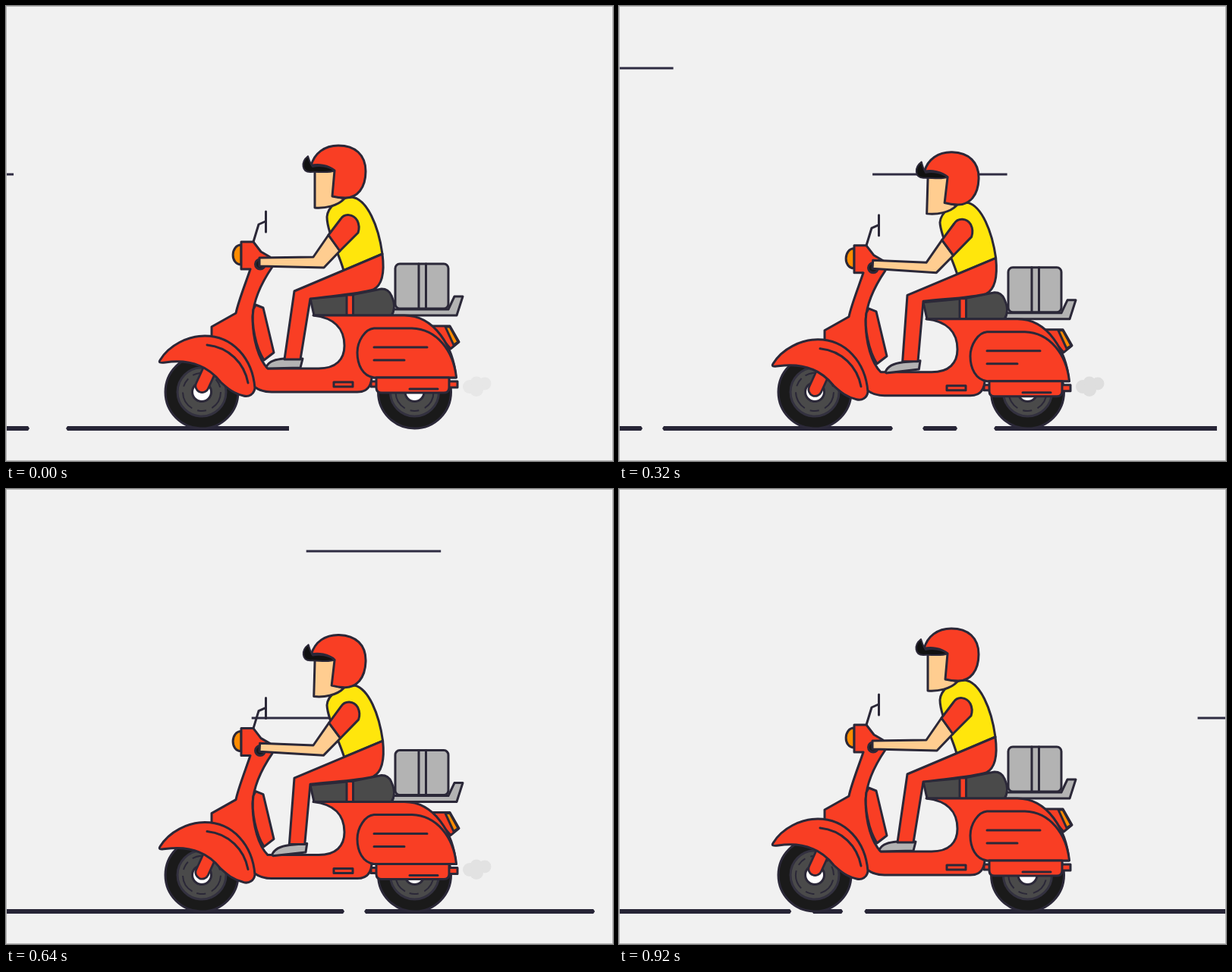
Recreate the animation shown at these times as an HTML page. Size 800 px wide and 600 px high, loop 0.96 s.

```html
<!DOCTYPE html>
<html lang="en">
<head>
<meta charset="utf-8">
<title>Scooter ride</title>
<style>
  html, body { margin: 0; width: 100%; height: 100%; overflow: hidden; background: #f1f1f1; }
  svg { display: block; width: 100vw; height: 100vh; }
  .ink { stroke: #2b2838; stroke-width: 3; stroke-linecap: round; stroke-linejoin: round; }
  .red { fill: #f93e24; }
  .grey { fill: #b3b3b3; }
  .seat { fill: #4a4a4a; }
  .skin { fill: #ffcd90; }
  .lamp { fill: #ff8c00; }
  .vest { fill: #ffe60c; }
  .none { fill: none; }
</style>
</head>
<body>
<svg viewBox="0 0 800 600">
  <defs>
    <g id="wheel">
      <circle class="ink" r="48" fill="#1a1a1a"/>
      <circle r="32" fill="#4a4a4a" stroke="#33313f" stroke-width="3"/>
      <circle class="spin" r="25" fill="none" stroke="#2b2838" stroke-width="2" stroke-dasharray="25 8 12 7.4"/>
      <circle class="ink" r="12.5" fill="#fff"/>
    </g>
  </defs>
  <rect width="800" height="600" fill="#f1f1f1"/>
  <g id="wind" fill="none" stroke="#2f2c42" stroke-width="3"></g>
  <g id="road" fill="none" stroke="#272536" stroke-width="6"></g>

  <g id="smoke" fill="#dadada">
    <circle cx="611" cy="502" r="9"/>
    <circle cx="620" cy="497" r="8.5"/>
    <circle cx="631" cy="498" r="8.5"/>
    <circle cx="620" cy="506" r="9"/>
  </g>

  <use href="#wheel" x="258" y="509"/>
  <use href="#wheel" x="538.5" y="509"/>

  <g id="scooter" class="ink">
    <path class="red" d="M481 495H490V502H481ZM583 495H595V503H583Z"/>
    <path class="red" d="M560 422H585L597 443L586 452Z"/>
    <path class="lamp" d="M579 423H585L596 443L590 447Z"/>
    <path class="none" d="M326 311L333 288L342 284M342.5 271V298"/>
    <path class="lamp" d="M310 315C296 315 295 341 310 341Z"/>

    <path class="grey" d="M511 400H583L591 383H602L594 408H509Z"/>
    <rect class="grey" x="513" y="340" width="70" height="59" rx="6"/>
    <path class="none" d="M544 340V399M553.5 340V399"/>

    <path class="seat" d="M401 386L406 408H508C513 400 512 390 508 382C505 375 500 373 495 373L455 381Z"/>
    <path class="red" d="M449 381H457.5V408H449Z"/>

    <path class="red" d="M310 311H326L336 324L348 331L351 344C336 366 326 390 325 410C325 440 333 466 345 478H412C435 478 446 466 446 448C446 425 432 411 405 408H525C565 408 590 450 593 490H482C481 503 474 509 463 509H350C340 509 334 507 327 502L271 440V423L303 405C306 390 316 365 322 347H310Z"/>
    <path class="red" d="M329 394L339 398L353 457L340 467C329 450 323 420 326 400Z"/>
    <path class="red" d="M485 425H535C568 426 590 455 593.5 490H485C470 488 463 473 463 457C463 442 473 426 485 425Z"/>
    <path class="none" d="M485 450H555M485 467H525"/>
    <path class="red" d="M432 496H457V502H432Z"/>
    <path class="red" d="M488 490H584V503Q584 510 577 510H495Q488 510 488 503Z"/>
    <path class="none" d="M532 505H569"/>
    <circle cx="335" cy="340.5" r="6.5" fill="#1a1a1a"/>

    <path class="none" d="M269 478L258.5 501" style="stroke-width:20"/>
    <path class="none" d="M269 478L258.5 501" style="stroke:#f93e24;stroke-width:14.5"/>
    <path class="red" d="M203 467C215 447 240 435 262 435C299 435 325 465 328 504C327 512 320 516 313 514C300 511 293 505 283 496C268 477 245 465 210 470C203 471 201 470 203 467Z"/>
    <path class="none" d="M265 447C294 450 314 471 319 497"/>
  </g>

  <g id="rider" class="ink"></g>

  <g id="head" class="ink">
    <path class="skin" d="M407 217V266C420 267 437 264 446 254L431 250L434 217Z"/>
    <path class="red" d="M430 251L433 217C425 210 410 208 402 211C406 194 420 184 438 184C460 184 474 196 474 218C474 240 463 253 447 253C440 253 434 252 430 251Z"/>
    <path d="M398 198C400 204 401 208 404 212C413 210 425 211 433 217C425 221 410 218 401 219C390 219 388 206 398 198Z" fill="#111" style="stroke-width:2"/>
  </g>
  <rect x=".5" y=".5" width="799" height="599" fill="none" stroke="#b4b4b4"/>
</svg>
<script>
const LOOP = 960, STEP = 40;
const $ = id => document.getElementById(id);

function addPath(parent, cls) {
  const el = document.createElementNS("http://www.w3.org/2000/svg", "path");
  el.setAttribute("class", cls);
  parent.appendChild(el);
  return el;
}

// Wind streaks: start x, y, length
const streaks = [[-167.5, 222, 177.5], [-607.5, 82, 177.5], [-679.5, 302, 110]]
  .map(s => [addPath($("wind"), ""), ...s]);

// Road dashes: start x, end x
const dashes = [[79, 373], [-15, 31], [-358, -54], [-870, -384], [-939, -898], [-1400, -966]]
  .map(d => [addPath($("road"), ""), ...d]);

// Soft parts of the rider: class, raised pose, lowered pose
const parts = [
  ["grey",
    "M343 476C347 467 358 466 367 465L391 465L388 477L345 478Z",
    "M355 486C358 477 369 473 378 472L400 469L399 480L356 487Z"],
  ["vest",
    "M423 278C424 266 438 252 456 252C476 255 491 290 496 327L445 349C440 329 423 298 423 278Z",
    "M423 289C424 276 440 263 462 263C479 269 492 300 497 335L446 356C440 337 424 306 423 289Z"],
  ["red",
    "M496 327L380 376L367 466L388 466L401 386C430 382 465 380 484 374C496 368 499 350 496 327Z",
    "M497 335L380 384L377 470L397 470L401 391C430 388 465 387 484 382C496 376 499 358 497 335Z"],
  ["skin",
    "M425 302L405 331L334 332L334 343L419 345L440 323Z",
    "M426 312L405 342L335 337L334 348L418 355L441 332Z"],
  ["red",
    "M425 302L441 281C446 273 458 274 463 283C466 289 465 296 464 299L440 323Z",
    "M426 312L442 290C447 282 459 282 464 291C467 297 466 304 465 307L441 332Z"]
].map(([cls, a, b]) => [addPath($("rider"), cls), a, b]);

function morph(a, b, k) {
  const to = b.match(/[\d.]+/g);
  let i = 0;
  return a.replace(/[\d.]+/g, n => (+n + (to[i++] - n) * k).toFixed(2));
}

function draw(ms) {
  const t = Math.floor(ms % LOOP / STEP) * STEP;
  const rising = t > 480;
  const k = rising ? (920 - t) / 440 : t / 480;

  for (const [el, x, y, len] of streaks)
    el.setAttribute("d", `M${x + t * 1.5675} ${y}h${len}`);

  dashes.forEach(([el, from, to], i) => {
    const a = from + t * 1.297, b = to + t * 1.297;
    // Tapered ends, except the blunt tail of the first dash
    const tail = i ? `L${b - 2} 554L${b} 557L${b - 2} 560` : `V554V560`;
    el.setAttribute("d", `M${a + 2} 554H${i ? b - 2 : b}${tail}H${a + 2}L${a} 557Z`);
    el.setAttribute("fill", "#272536");
    el.setAttribute("stroke", "none");
  });

  $("smoke").setAttribute("opacity", rising ? k : 0.43 + 0.57 * k);
  document.querySelector(".spin").setAttribute("transform", `rotate(${-360 * t / LOOP})`);
  $("scooter").setAttribute("transform", `translate(0 ${7.2 * k})`);
  $("head").setAttribute("transform", `translate(0 ${13.2 * k}) rotate(${2.5 * k} 438 220)`);
  for (const [el, a, b] of parts) el.setAttribute("d", morph(a, b, k));
}

const start = performance.now();
function tick() {
  draw(performance.now() - start);
  requestAnimationFrame(tick);
}
draw(0);
requestAnimationFrame(tick);
</script>
</body>
</html>
```
